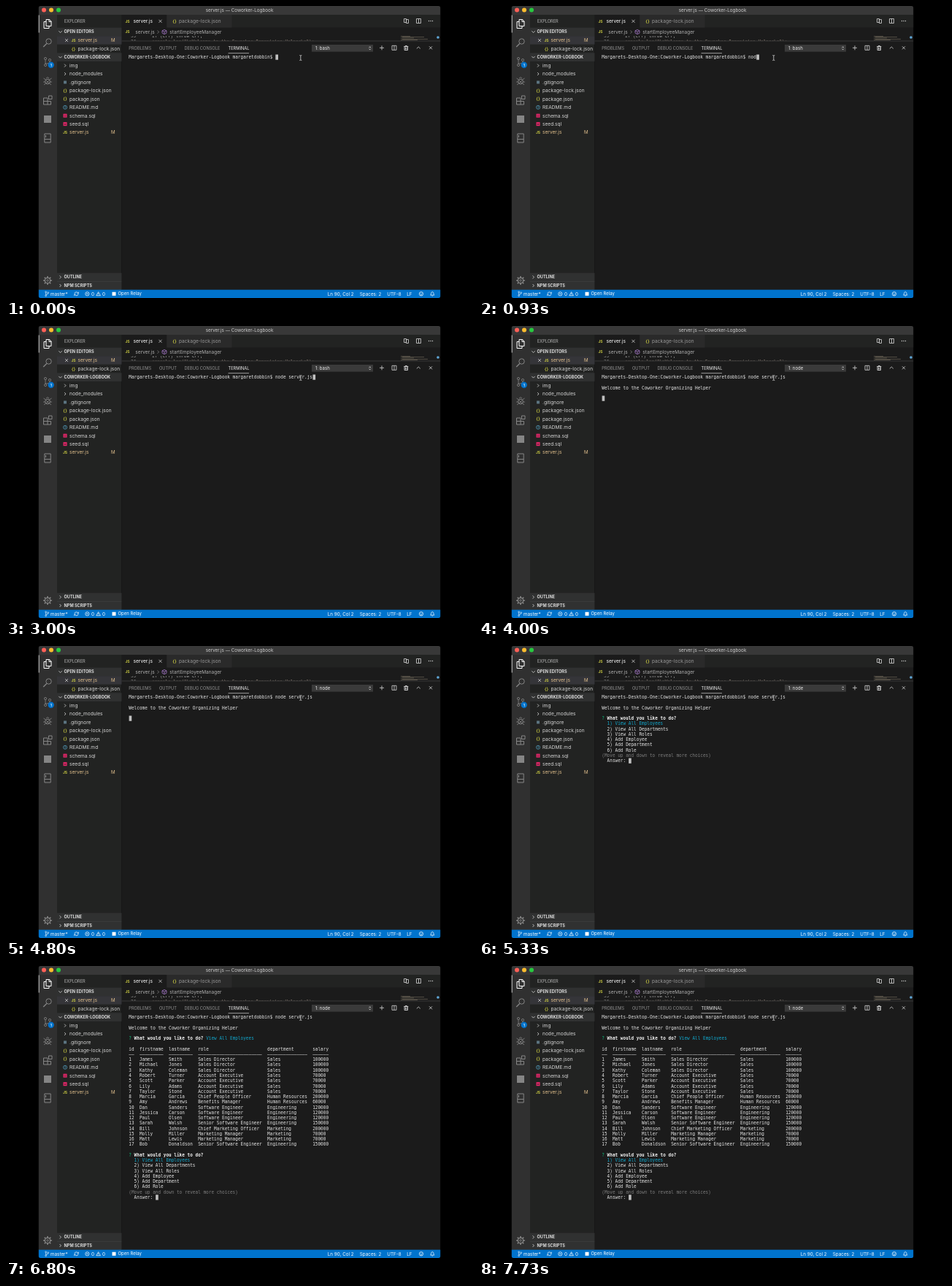
These frames come from a looping animation (640 px wide and 400 px high, 8000 ms). An HTML page with a canvas:

```html
<!DOCTYPE html>
<html lang="en">
<head>
<meta charset="utf-8">
<title>Terminal session</title>
<style>
html, body { margin: 0; width: 100%; height: 100%; overflow: hidden; background: #000; }
canvas { display: block; width: 640px; height: 400px; }
</style>
</head>
<body>
<canvas id="stage" width="640" height="400"></canvas>
<script>
const ctx = document.getElementById('stage').getContext('2d');
const UI = 'Inter, "Open Sans", sans-serif';
const MONO = '"DejaVu Sans Mono", monospace';
const LOOP = 8000;
const CELL = 3.65, ROW = 7.26, LEFT = 168.3, TOP = 70;
const EDITOR = '#1b1b1b', SIDEBAR = '#222322', HEADER = '#303131';
const YELLOW = '#cbcb41', MODIFIED = '#e2c08d', GREY = '#969696', LIGHT = '#d6d6d6', OUTPUT = '#e4e4e4';
const PROJECT = 'Coworker-Logbook', PRODUCT = 'Coworker Organizing Helper';
const PROMPT = `Margarets-Desktop-One:${PROJECT} margaretdobbin$ `;
const COMMAND = 'node server.js';

const KEY_TIMES = [730, 800, 930, 1000, 1130, 1400, 1460, 1730, 1800, 1860, 2060, 2200, 2330, 2400];
const ENTER = 3130, NODE = 3260, WELCOME = 3330, MENU = 5060, RESULT = 6730;

const CHOICES = ['View All Employees', 'View All Departments', 'View All Roles',
  'Add Employee', 'Add Department', 'Add Role'];
const COLUMNS = [['id', 2], ['firstname', 9], ['lastname', 9], ['role', 24], ['department', 15], ['salary', 6]];
const STAFF = `James|Smith|Sales Director|Sales|100000
Michael|Jones|Sales Director|Sales|100000
Kathy|Coleman|Sales Director|Sales|100000
Robert|Turner|Account Executive|Sales|70000
Scott|Parker|Account Executive|Sales|70000
Lily|Adams|Account Executive|Sales|70000
Taylor|Stone|Account Executive|Sales|70000
Marcia|Garcia|Chief People Officer|Human Resources|200000
Amy|Andrews|Benefits Manager|Human Resources|60000
Dan|Sanders|Software Engineer|Engineering|120000
Jessica|Carson|Software Engineer|Engineering|120000
Paul|Olsen|Software Engineer|Engineering|120000
Sarah|Walsh|Senior Software Engineer|Engineering|150000
Bill|Johnson|Chief Marketing Officer|Marketing|200000
Molly|Miller|Marketing Manager|Marketing|70000
Matt|Lewis|Marketing Manager|Marketing|70000
Bob|Donaldson|Senior Software Engineer|Engineering|150000`.split('\n').map((s, i) => [i + 1, ...s.split('|')]);

function rect(x, y, w, h, color) {
  ctx.fillStyle = color;
  ctx.fillRect(x, y, w, h);
}

function disc(x, y, r, color) {
  ctx.fillStyle = color;
  ctx.beginPath();
  ctx.arc(x, y, r, 0, 7);
  ctx.fill();
}

function ring(x, y, r, color, width = 0.8) {
  ctx.strokeStyle = color;
  ctx.lineWidth = width;
  ctx.beginPath();
  ctx.arc(x, y, r, 0, 7);
  ctx.stroke();
}

// Strokes an SVG path placed around (x, y).
function icon(path, x, y, color, width = 0.8) {
  ctx.save();
  ctx.translate(x, y);
  ctx.strokeStyle = color;
  ctx.lineWidth = width;
  ctx.stroke(new Path2D(path));
  ctx.restore();
}

// Type is set large and scaled down so that glyph advances stay fractional.
function text(str, x, y, color, size = 6.6, { font = UI, weight = 400, align = 'left' } = {}) {
  ctx.save();
  ctx.translate(x, y + size * 0.355);
  ctx.scale(0.1, 0.1);
  ctx.font = `${weight} ${size * 10}px ${font}`;
  ctx.textAlign = align;
  ctx.fillStyle = color;
  ctx.fillText(str, 0, 0);
  ctx.restore();
}

const centered = { align: 'center' };
const CHEVRON_DOWN = 'M-2.2-1.1L0 1.1L2.2-1.1', CHEVRON_RIGHT = 'M-1-2L1 0L-1 2';
const CROSS = 'M-2-2L2 2M2-2L-2 2';
const SPLIT = 'M-3-3H3V3H-3ZM0-3V3';

const js = (x, y) => text('JS', x, y, YELLOW, 5, { weight: 700, align: 'center' });
const braces = (x, y) => text('{}', x, y, YELLOW, 6, { weight: 600, align: 'center' });

function titleBar() {
  rect(44.5, 0, 551, 12, '#383838');
  ['#ff5f57', '#febc2e', '#28c840'].forEach((c, i) => disc(52 + i * 10, 5.5, 3, c));
  text(`server.js — ${PROJECT}`, 320, 5.7, '#cfcfcf', 6.3, centered);
}

function activityBar() {
  const c = '#858585';
  rect(44.5, 12, 25.5, 377, '#303030');
  rect(44.5, 12.5, 1, 24, '#ffffff');
  icon('M-2-6H2.5L5-3.5V3H-2ZM2-6V-3H5M-2-3H-5V6H2V3', 57, 24.5, '#ffffff', 1);
  ring(58.5, 48.5, 3.7, c, 1);
  icon('M-1.5 1.5L-6 6', 57.2, 50, c, 1.2);
  ring(54, 72, 1.6, c);
  ring(54, 81, 1.6, c);
  ring(60, 74, 1.6, c);
  icon('M-3-2.5V3.5M3 0Q3 3-3 3', 57, 76, c);
  disc(61.7, 80.8, 4.2, '#0073cc');
  text('1', 61.7, 80.9, '#ffffff', 5, { weight: 600, align: 'center' });
  ring(57, 103.5, 3.4, c, 1);
  icon('M-5.5-4L-2.5-2M5.5-4L2.5-2M-6 1H-3M6 1H3M-5 5L-2.5 3M5 5L2.5 3M-2-4Q0-7 2-4M-2-1L2 3M2-1L-2 3', 57, 103, c);
  icon('M-5.5-3H0V6H-5.5ZM-5.5 1.5H4.5V6H0M1.5-6H6V-1.5H1.5Z', 57, 129, c, 1);
  rect(52, 150, 10, 10, c);
  icon('M-4.2-6H4.2V6H-4.2ZM-4.2 1.5H4.2M-2.5-4V-1', 57, 181, c, 1);
  ring(57, 376, 3.7, c, 1.2);
  ring(57, 376, 1.3, c);
  for (let i = 0; i < 8; i++) {
    const a = i * Math.PI / 4, u = Math.cos(a), v = Math.sin(a);
    icon(`M${u * 4} ${v * 4}L${u * 6} ${v * 6}`, 57, 376, c, 1.6);
  }
}

function section(label, y, open) {
  rect(70, y - 5.7, 88.5, 11.5, HEADER);
  icon(open ? CHEVRON_DOWN : CHEVRON_RIGHT, 74.5, y, LIGHT);
  text(label, 79.5, y, '#dedede', 5.6, { weight: 700 });
}

function fileIcon(kind, y) {
  const x = 81;
  if (kind === 'dir') icon(CHEVRON_RIGHT, x, y, LIGHT);
  if (kind === 'git') rect(x - 2, y - 2, 4, 4, '#5b7480');
  if (kind === 'json') braces(x, y);
  if (kind === 'js') js(x, y);
  if (kind === 'info') {
    ring(x, y, 2.5, '#519aba');
    text('i', x, y, '#519aba', 4.5, { weight: 700, align: 'center' });
  }
  if (kind === 'sql') {
    rect(x - 2.5, y - 2.5, 5, 5, '#f5276f');
    rect(x - 1.5, y - 0.8, 3, 0.6, SIDEBAR);
    rect(x - 1.5, y + 0.7, 3, 0.6, SIDEBAR);
  }
}

function sideBar() {
  rect(70, 12, 88.5, 377, SIDEBAR);
  text('EXPLORER', 80, 21, '#bbbbbb', 5.6);
  section('OPEN EDITORS', 35.4, true);
  rect(70, 41.2, 88.5, 11.4, '#353539');
  icon(CROSS, 83, 47, LIGHT, 0.7);
  js(92.5, 47);
  text('server.js', 98.5, 47, MODIFIED);
  text('M', 146.7, 47, MODIFIED, 6.2, centered);
  braces(92.5, 58.6);
  text('package-lock.json', 98.5, 58.6, LIGHT);
  section(PROJECT.toUpperCase(), 70, true);
  [['dir', 'img'], ['dir', 'node_modules'], ['git', '.gitignore'], ['json', 'package-lock.json'],
   ['json', 'package.json'], ['info', 'README.md'], ['sql', 'schema.sql'], ['sql', 'seed.sql'],
   ['js', 'server.js']].forEach(([kind, name], i) => {
    const y = 81.6 + i * 11.44;
    fileIcon(kind, y);
    text(name, 87, y, kind === 'js' ? MODIFIED : LIGHT);
  });
  text('M', 146.7, 173.1, MODIFIED, 6.2, centered);
  section('OUTLINE', 371.4, false);
  section('NPM SCRIPTS', 383, false);
  rect(70, 377, 88.5, 0.5, '#474747');
}

function editor() {
  rect(158.5, 12, 437, 377, EDITOR);
  rect(158.5, 12, 437, 17.5, SIDEBAR);
  rect(158.5, 12, 61.5, 17.5, EDITOR);
  rect(220.5, 12, 89, 17.5, '#2a2a2a');
  js(166.5, 21);
  text('server.js', 174.5, 21, '#ffffff');
  icon(CROSS, 211.5, 20.8, LIGHT);
  braces(231, 21);
  text('package-lock.json', 237, 21, '#999999');
  icon('M-3-3H0V2H-3ZM3 3H0V-2H3Z', 548.5, 20.5, LIGHT);
  icon(SPLIT, 565.5, 20.5, LIGHT);
  [-2.5, 0, 2.5].forEach(d => disc(582 + d, 20.5, 0.7, LIGHT));

  js(166.5, 35.5);
  text('server.js', 177.3, 35.5, '#b0b0b0');
  icon(CHEVRON_RIGHT, 208.5, 35.6, '#a9a9a9', 0.6);
  icon('M0-3L3-1.5V1.7L0 3.2L-3 1.7V-1.5ZM-3-1.5L0 0L3-1.5M0 0V3', 217, 35.4, '#b180d7', 0.7);
  text('startEmployeeManager', 224.3, 35.5, '#b0b0b0', 6.5);

  ctx.save();
  ctx.beginPath();
  ctx.rect(158.5, 41, 437, 6.6);
  ctx.clip();
  const code = { font: MONO };
  text('35', 171, 41.3, '#858585', 6.06, code);
  text('if (err) throw err;', 200, 41.3, '#a8a8a8', 6.06, code);
  text('36', 171, 49, '#858585', 6.06, code);
  text(`console.log("\\nWelcome to the ${PRODUCT}\\n");`, 200, 49, '#a09084', 6.06, code);
  ctx.restore();
  for (let i = 0; i < 5; i++) rect(541 + (i % 2) * 2, 41 + i * 1.3, 13 + (i * 17) % 29, 0.7, '#6a6456');
  disc(592, 43, 1.8, '#5fa8d8');
}

function panelHeader(shell) {
  rect(158.5, 47.6, 437, 0.7, '#444444');
  ['PROBLEMS', 'OUTPUT', 'DEBUG CONSOLE', 'TERMINAL'].forEach((label, i) => {
    text(label, [168.3, 210, 244.5, 304.5][i], 57.9, i === 3 ? '#efefef' : GREY, 5.7);
  });
  rect(304.5, 64.4, 28.5, 0.7, '#d0d0d0');
  rect(419, 53, 84, 9.6, '#3a3a3a');
  text(`1: ${shell}`, 424, 57.9, '#f0f0f0', 6);
  icon('M-1.2-.8L0-2L1.2-.8M-1.2 .8L0 2L1.2 .8', 498.7, 57.8, '#f0f0f0', 0.8);
  icon('M-3 0H3M0-3V3', 515, 57.3, LIGHT);
  icon(SPLIT, 532, 57.3, LIGHT);
  icon('M-3-2H3M-1-2V-3H1V-2M-2.2-2V3H2.2V-2M-.7-.8V2M.7-.8V2', 548.3, 57.5, LIGHT, 0.9);
  icon('M-2.5 1.2L0-1.2L2.5 1.2', 565.3, 57.2, LIGHT);
  icon(CROSS, 582, 57.3, LIGHT);
}

function statusBar() {
  const w = '#ffffff', size = 6.3, y = 394.3;
  rect(44.5, 388.7, 551, 11.3, '#0073cc');
  ring(54.6, 391.8, 0.9, w, 0.6);
  ring(54.6, 396.8, 0.9, w, 0.6);
  ring(57.6, 392.8, 0.9, w, 0.6);
  icon('M-1.4-1.6V1.6M1.6-.6Q1.6 1-1.4 1', 56, y, w, 0.6);
  text('master*', 61, y, w, size);
  icon('M-2.6-.3A2.6 2.6 0 0 1 2.3-1M2.6 .3A2.6 2.6 0 0 1-2.3 1M2.8-2.6V-.6H1M-2.8 2.6V.6H-1', 96.5, y, w, 0.7);
  ring(111.3, y, 2.6, w, 0.7);
  icon('M-1-1L1 1M1-1L-1 1', 111.3, y, w, 0.7);
  text('0', 117, y, w, size);
  icon('M0-2.6L2.8 2.4H-2.8ZM0-.8V.9', 126.6, y, w, 0.7);
  text('0', 132, y, w, size);
  rect(145.5, 391.8, 5, 5, w);
  text('Open Relay', 153.5, y, w, size - 0.3);
  text('Ln 90, Col 2', 440.8, y, w, size);
  text('Spaces: 2', 484.8, y, w, size);
  text('UTF-8', 522.3, y, w, size);
  text('LF', 549.3, y, w, size);
  ring(569, y, 2.7, w, 0.7);
  icon('M-1.4 .6Q0 2.2 1.4 .6M-1-1.2V-.4M1-1.2V-.4', 569, y, w, 0.7);
  icon('M-2.6 1.8Q-1.7 1-1.7-.8Q-1.5-2.6 0-2.7Q1.5-2.6 1.7-.8Q1.7 1 2.6 1.8ZM-.7 2.8H.7', 584.3, y, w, 0.7);
}

function print(row, col, str, color = OUTPUT, weight = 400) {
  text(str, LEFT + col * CELL, TOP + row * ROW, color, 6.06, { font: MONO, weight });
}

function caret(row, col) {
  rect(LEFT + col * CELL + 0.3, TOP + row * ROW - 3.5, CELL, 7.2, '#c0c0c0');
}

function question(row) {
  print(row, 0, '?', '#0dbc79');
  print(row, 2, 'What would you like to do?', '#f2f2f2', 700);
}

function menu(row) {
  question(row);
  CHOICES.forEach((choice, i) => print(row + 1 + i, 2, `${i + 1}) ${choice}`, i ? OUTPUT : '#11a8cd'));
  print(row + 7, 0, '(Move up and down to reveal more choices)', '#7c7c7c');
  print(row + 8, 2, 'Answer:');
  caret(row + 8, 10);
}

function table(row) {
  let col = 0;
  COLUMNS.forEach(([name, width], c) => {
    print(row, col, name);
    print(row + 1, col, '–'.repeat(width));
    STAFF.forEach((person, r) => print(row + 2 + r, col, String(person[c])));
    col += width + 2;
  });
}

function terminal(t) {
  const typed = KEY_TIMES.filter(k => t >= k).length;
  print(0, 0, PROMPT + COMMAND.slice(0, typed));
  if (t >= WELCOME) print(2, 0, `Welcome to the ${PRODUCT}`);
  if (t < ENTER) caret(0, PROMPT.length + typed);
  else if (t < WELCOME) caret(1, 0);
  else if (t < MENU) caret(4, 0);
  else if (t < RESULT) menu(4);
  else {
    question(4);
    print(4, 29, CHOICES[0], '#11a8cd');
    table(6);
    menu(26);
  }
}

function pointer() {
  const beam = 'M-1.5-3.5Q0-3.5 0-2.5Q0-3.5 1.5-3.5M0-2.5V2.5M-1.5 3.5Q0 3.5 0 2.5Q0 3.5 1.5 3.5';
  icon(beam, 403.8, 71, EDITOR, 1.5);
  icon(beam, 403.8, 71, '#d8d8d8', 0.8);
}

function draw(t) {
  ctx.clearRect(0, 0, 640, 400);
  ctx.save();
  ctx.beginPath();
  ctx.roundRect(44.5, 0, 551, 400, 3);
  ctx.clip();
  editor();
  activityBar();
  sideBar();
  titleBar();
  panelHeader(t < NODE ? 'bash' : 'node');
  terminal(t);
  statusBar();
  pointer();
  ctx.restore();
}

const start = performance.now();
function tick() {
  draw((performance.now() - start) % LOOP);
  requestAnimationFrame(tick);
}
tick();
</script>
</body>
</html>
```
